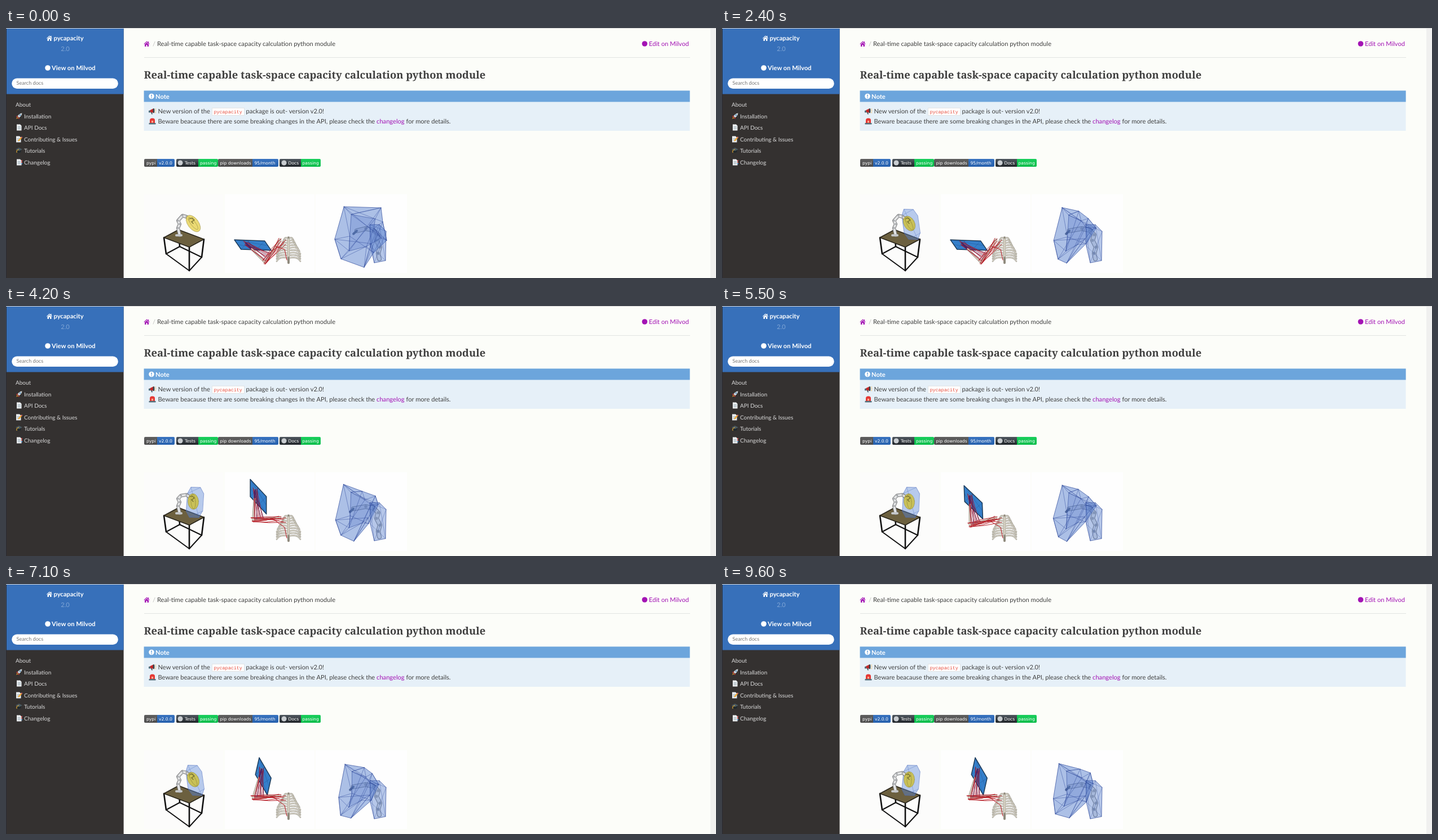
Write an HTML page with a canvas that moves like this. It is 1259 px wide and 445 px high and loops after 9.7 s.

```html
<!DOCTYPE html>
<html lang="en">
<head>
<meta charset="utf-8">
<title>pycapacity</title>
<style>
html, body { margin: 0; width: 100%; height: 100%; overflow: hidden; background: #fcfdf9; }
svg, canvas { position: absolute; left: 0; top: 0; }
text { font: 11.13px Lato, sans-serif; fill: #404040; text-rendering: geometricPrecision; white-space: pre; }
.bold { font-weight: bold; fill: #fff; }
.menu text { font-size: 10px; fill: #d9d9d9; }
.badges text { font: 7.65px "DejaVu Sans", sans-serif; fill: #fff; }
.link { fill: #a313b4; }
</style>
</head>
<body>
<svg width="1259" height="445">
  <defs>
    <path id="home" d="M0 5.2 5 .6 7 2.4V1H8.5V3.8L10 5.2 9.3 6 5 2.1.7 6ZM1.5 6.2 5 3 8.5 6.2V10H6V7H4V10H1.5Z"/>
    <g id="page">
      <path d="M2 .5H8L10.5 3V11.5H2Z" fill="#eceff1"/>
      <path d="M3.5 4.5H9M3.5 6.5H9M3.5 8.5H9" stroke="#90a4ae" stroke-width=".8"/>
    </g>
    <linearGradient id="dark" x2="0" y2="1"><stop stop-color="#444d56"/><stop offset="1" stop-color="#24292e"/></linearGradient>
    <linearGradient id="shade" x2="0" y2="1"><stop stop-color="#bbb" stop-opacity=".1"/><stop offset="1" stop-opacity=".1"/></linearGradient>
    <clipPath id="round">
      <rect x="245" y="233" width="54" height="14" rx="2"/><rect x="302" y="233" width="74" height="14" rx="2"/>
      <rect x="376" y="233" width="107" height="14" rx="2"/><rect x="485" y="233" width="73" height="14" rx="2"/>
    </clipPath>
  </defs>

  <!-- sidebar -->
  <rect width="208.6" height="445" fill="#343130"/>
  <rect width="208.6" height="117.6" fill="#3770ba"/>
  <rect width="1" height="445" fill="#2a2c33"/>
  <use href="#home" x="72" y="13" fill="#fff"/>
  <text class="bold" x="84.5" y="22">pycapacity</text>
  <text x="105" y="41" text-anchor="middle" style="fill:#7fa5d6">2.0</text>
  <circle cx="74" cy="71" r="4.8" fill="#fff"/>
  <text class="bold" x="81" y="75">View on Milvod</text>
  <rect x="10.2" y="89.6" width="188.6" height="18.4" rx="9.2" fill="#fff"/>
  <text x="18.5" y="101.3" style="font-size:9.1px;fill:#757575">Search docs</text>
  <g class="menu">
    <text x="17" y="140">About</text>
    <text x="32" y="160.5">Installation</text>
    <text x="32" y="181">API Docs</text>
    <text x="32" y="201.5">Contributing &amp; Issues</text>
    <text x="32" y="222">Tutorials</text>
    <text x="32" y="242.5">Changelog</text>
  </g>
  <g transform="translate(17 151)">
    <path d="M4 5 1 6 3 8ZM7 8 6 11 4 9Z" fill="#e53935"/>
    <path d="M11.5 .5Q6.500 1 3.500 6L6 8.500Q11 5.500 11.500 .5Z" fill="#cfd8dc"/>
    <path d="M3 7.500 1 11 4.500 9Z" fill="#ffa726"/>
    <circle cx="8" cy="4" r="1.2" fill="#3f7fb5"/>
  </g>
  <use href="#page" x="17" y="171"/>
  <use href="#page" x="16" y="192"/>
  <path d="M22 201 27.5 195" stroke="#f5a623" stroke-width="2"/>
  <path d="M27 195.5 28.5 194" stroke="#e57373" stroke-width="2"/>
  <g transform="translate(17 212)">
    <path d="M3 5V9Q6 11 9.5 9V5Z" fill="#20282c"/>
    <path d="M0 4 6 1 12 4 6 7Z" fill="#4b5a61"/>
    <path d="M6 4 2 6V10" fill="none" stroke="#f2b632"/>
  </g>
  <use href="#page" x="17" y="233"/>
  <path d="M27 236H29M27 239H29" stroke="#ef5350" stroke-width="1.5"/>
  <path d="M27 241.5H29" stroke="#42a5f5" stroke-width="1.5"/>

  <!-- heading and note -->
  <rect x="1249" width="10" height="445" fill="#f0f0ef"/>
  <rect width="1259" height="1" fill="#d5d5d5"/>
  <use class="link" href="#home" x="244.5" y="23"/>
  <text x="260" y="32" style="fill:#bbb">/</text>
  <text x="268" y="32">Real-time capable task-space capacity calculation python module</text>
  <circle class="link" cx="1132.5" cy="28" r="4.8"/>
  <text class="link" x="1140" y="32">Edit on Milvod</text>
  <rect x="245" y="52" width="968" height="1" fill="#e1e4e2"/>
  <text x="244.5" y="89.5" style="font:bold 18.42px 'Noto Serif',serif">Real-time capable task-space capacity calculation python module</text>
  <rect x="244.6" y="111.5" width="968" height="71.5" fill="#e6f0f8"/>
  <rect x="244.6" y="111.5" width="968" height="20" fill="#6ca5dc"/>
  <circle cx="258" cy="121.5" r="4.8" fill="#fff"/>
  <path d="M258 118.5V122.3M258 123.3V124.8" stroke="#6ca5dc" stroke-width="1.5"/>
  <text class="bold" x="265" y="125.5">Note</text>
  <g transform="translate(253 142)">
    <path d="M1 5 8 1.5 9.5 9 2 8Z" fill="#c62828"/>
    <path d="M0 5H3V8.5H0Z" fill="#546e7a"/>
    <path d="M4 8H6L7 11.5H5Z" fill="#455a64"/>
    <ellipse cx="9" cy="5.2" rx="1.4" ry="4.2" fill="#37474f"/>
    <path d="M11 3 13 2M11.5 5.5H13.5M11 8 13 9" stroke="#ffb74d"/>
  </g>
  <text x="269.5" y="151.7">New version of the</text>
  <rect x="365.5" y="142.5" width="57" height="13" fill="#fff" stroke="#e1e4e5"/>
  <text x="368.5" y="151.5" style="font:8.4px 'Liberation Mono',monospace;fill:#e74c3c">pycapacity</text>
  <text x="425.5" y="151.7">package is out- version v2.0!</text>
  <g transform="translate(253 160)">
    <path d="M2 9.5V4Q2 .5 6.500 .5T11 4V9.5Z" fill="#e53935"/>
    <path d="M5 8.5V5H8V8.5Z" fill="#ffab91"/>
    <rect x=".5" y="9" width="12" height="2.5" fill="#546e7a"/>
  </g>
  <text x="269.5" y="170">Beware beacause there are some breaking changes in the API, please check the <tspan class="link">changelog</tspan> for more details.</text>

  <!-- badges -->
  <g class="badges">
    <g clip-path="url(#round)">
      <path d="M245 233H268V247H245ZM376 233H437V247H376Z" fill="#555"/>
      <path d="M268 233H299V247H268ZM437 233H483V247H437Z" fill="#2a6bc0"/>
      <path d="M302 233H341V247H302ZM485 233H523V247H485Z" fill="url(#dark)"/>
      <path d="M341 233H376V247H341ZM523 233H558V247H523Z" fill="#08d152"/>
      <rect x="245" y="233" width="313" height="14" fill="url(#shade)"/>
    </g>
    <circle cx="309" cy="240" r="4.5" fill="#c9cdd1"/>
    <circle cx="493" cy="240" r="4.5" fill="#c9cdd1"/>
    <text x="249" y="242.7">pypi</text><text x="271" y="242.7">v2.0.0</text>
    <text x="317" y="242.7">Tests</text><text x="344" y="242.7">passing</text>
    <text x="379.5" y="242.7">pip downloads</text><text x="440.5" y="242.7">95/month</text>
    <text x="500.5" y="242.7">Docs</text><text x="525.5" y="242.7">passing</text>
  </g>
  <rect x="245" y="296" width="140" height="140" fill="#fcfcfb"/>
  <path d="M388 296H547V436H388ZM549 296H711V436H549Z" fill="#fefefe"/>
</svg>
<canvas id="view" width="1259" height="445"></canvas>
<script>
const ctx = document.getElementById('view').getContext('2d');
ctx.lineJoin = ctx.lineCap = 'round';

const { sin, cos, abs, sign, PI } = Math;
const mix = (a, b, f) => a + (b - a) * f;
const between = (p, q, f) => p.map((v, k) => mix(v, q[k], f));
const offset = (p, angle, r) => [p[0] + r * cos(angle), p[1] + r * sin(angle)];
const ease = x => { x = Math.min(1, Math.max(0, x)); return x * x * (3 - 2 * x); };
const bump = (x, width) => ease(1 - abs(x) / width);
const rad = degrees => degrees * PI / 180;

function line(points, color, width = 1, fill, close = !!fill) {
  ctx.beginPath();
  points.forEach(p => ctx.lineTo(...p));
  if (close) ctx.closePath();
  if (fill) { ctx.fillStyle = fill; ctx.fill(); }
  ctx.strokeStyle = color;
  ctx.lineWidth = width;
  ctx.stroke();
}

function tube(points, width) {
  line(points, '#77787a', width + 1);
  line(points, '#e3e4e5', width - 1);
  points.slice(1, -1).forEach(p => line([p, p], '#a4a7aa', width - 1.5));
}

function oval(rx, ry) {
  ctx.beginPath();
  ctx.ellipse(0, 0, rx, ry, 0, 0, 2 * PI);
}

// Squarish ring of eight corners, sheared by lean
function drawPolytope(lean) {
  const round = v => sign(v) * abs(v) ** .6;
  const ring = Array.from({ length: 8 }, (_, i) => {
    const a = (i + .4) * PI / 4, y = 28 * round(sin(a));
    return [335 + 15 * round(cos(a)) + lean * y, 349.5 + y + 2 * cos(a)];
  });
  line(ring, 'rgba(80,110,190,.75)', .8, 'rgba(90,135,215,.42)');
  ring.forEach((p, i) => line([p, ring[(i * 3 + 2) % 8]], 'rgba(80,110,190,.3)', .7));
}

function drawTable(t) {
  const top = [[280, 373], [306, 359], [351, 376], [325, 390]];
  const feet = [[284, 402], [308, 389], [347, 408], [325, 432]];
  line(feet, '#111', 2, null, true);
  top.forEach((p, i) => line([p, feet[i]], '#111', 2.6));
  line(top, '#29251b', 1.5, '#6c603f');

  const shown = t >= 1500;
  const sway = shown ? cos(2 * PI * (t - 2350) / 4850) : 1;
  if (shown) drawPolytope(.12 * sway);
  tube([[308, 369], [305, 356], [308, 349], [305, 343], [311.5 + 1.5 * sway, 336 - 2 * sway], [320, 336], [328, 342]], 5);
  line([[302, 369], [311, 369]], '#c4c6c8', 4);

  ctx.save();
  ctx.translate(332, 348);
  ctx.rotate(shown ? -.25 - .25 * sway : -.65);
  oval(9.5, shown ? 14 : 17);
  ctx.fillStyle = shown ? 'rgba(205,192,62,.85)' : 'rgba(232,212,92,.85)';
  ctx.fill();
  ctx.strokeStyle = 'rgba(110,102,40,.55)';
  ctx.lineWidth = .7;
  ctx.stroke();
  oval(4, 13);
  ctx.stroke();
  ctx.restore();
  line([[325, 340], [330, 338], [334, 342], [329, 345], [332, 348]], '#6d682d', 1.2);
}

function drawRibs() {
  line([[501, 373], [501, 418]], '#8f8a7d', 4);
  for (let i = 0; i < 9; i++) {
    const y = 374 + i * 4.4, w = Math.min(9 + i * 2.6, 21);
    for (const s of [-1, 1]) {
      ctx.beginPath();
      ctx.moveTo(501 + s * 2, y);
      ctx.quadraticCurveTo(501 + s * w * .8, y - 3, 501 + s * w, y + 6);
      for (const [color, width] of [['#7f7b70', 2.5], ['#dedacd', 1.5]]) {
        ctx.strokeStyle = color;
        ctx.lineWidth = width;
        ctx.stroke();
      }
    }
  }
  line([[501, 376], [501, 406]], '#d7d2c4', 3);
}

function drawArm(t) {
  const u = t % 2500, shoulder = [486, 377];
  const lift = ease(u / 720) * ease((2360 - u) / 220);
  const bend = rad(mix(-45, 3 - 14 * cos(2 * PI * (u - 1200) / 1900), lift));
  const elbow = offset(shoulder, rad(mix(124, 176, lift)), 48);
  const hand = offset(elbow, bend - PI / 2, mix(48, 53, lift));
  drawRibs();

  const tilt = bend + rad(61), center = offset(hand, tilt, 13), skew = mix(18, 6, lift);
  const plate = [[-34, 0], [skew, 13], [34, 0], [-skew, -13]]
    .map(([along, across]) => offset(offset(center, tilt, along), tilt - PI / 2, across));
  line(plate, '#1d3b58', 1.5, '#357fca');
  plate.forEach((p, i) => line([p, between(plate[(i + 1) % 4], plate[(i + 2) % 4], .5)], 'rgba(25,65,125,.45)', .7));

  line([shoulder, elbow, hand], '#8c8677', 4);
  line([shoulder, elbow, hand], '#ddd8ca', 2.6);
  for (let i = 0; i < 9; i++) {
    const shift = (p, r) => [p[0] + r * sin(i * 2.3), p[1] + r * cos(i * 1.7)];
    const start = [484 + i % 4 * 4, 374 + i * 5 % 12], joint = shift(elbow, 4);
    line([start, shift(between(start, joint, .5), 2), joint], '#b3121c', .9);
    line([between(shoulder, elbow, .6 + i * .045), shift(hand, 4)], i % 3 ? '#a5142b' : '#67204f', .9);
  }
  line([between(shoulder, elbow, .3), [494, 394], [498, 413]], '#b3121c');
  line([between(elbow, hand, .75), hand], '#472369', 3);
}

function drawReach(t) {
  const u = t % 5000;
  const moved = Math.min(u, 3000) + Math.max(0, u - 4000); // rests for one second
  const open = bump(u, 480) + bump(u - 5000, 380), shrink = .27 * bump(u - 1000, 450);
  const slim = [[600, 319], [633, 328], [652, 338], [661, 355], [645, 386], [614, 418], [594, 410], [587, 380]];
  const wide = [[599, 318], [665, 320], [668, 345], [675, 378], [652, 400], [635, 426], [594, 411], [583, 376]];
  const hull = slim.map((p, i) => {
    const [x, y] = between(p, wide[i], open), wave = 2 * PI * moved / 2000 + i * 2;
    return [x + 3 * (1 - open) * sin(wave), mix(y, 318, shrink) + 2 * (1 - open) * cos(wave)];
  });
  const tail = [[645, 350], [662, 350], [674, 362], [673, 414], [653, 418], [646, 388]];
  const wrist = [616 + 6 * open, 361 - 4 * shrink];

  tube([[662, 411], [660, 401], [663, 390], [657, 378], [660, 368], [652, 360], [638, 357], wrist], 7);
  line([wrist, offset(wrist, 2.4, 8)], '#4c5870', 4);
  const edge = 'rgba(48,74,155,.7)';
  line(hull, edge, 1, 'rgba(85,125,205,.48)');
  line(tail, edge, 1, 'rgba(85,125,205,.42)');
  const inner = hull.map((p, i) => between(p, [642, 364], .3 + .15 * (i % 3)));
  line(inner, edge, .8, 'rgba(75,112,195,.28)');
  const knots = [...hull, ...inner];
  knots.forEach((p, i) => line([p, knots[(i * 5 + 9) % 16]], edge, .7));
  hull.forEach((p, i) => line([p, inner[i], hull[(i + 1) % 8]], edge, .7));
  tail.forEach((p, i) => line([p, tail[(i + 2) % 6]], 'rgba(48,74,155,.5)', .7));
}

function frame(now) {
  const t = Math.floor(now % 9700 / 100) * 100;
  ctx.clearRect(0, 0, 1259, 445);
  drawTable(t);
  drawArm(t);
  drawReach(t);
  requestAnimationFrame(frame);
}
requestAnimationFrame(frame);
</script>
</body>
</html>
```
